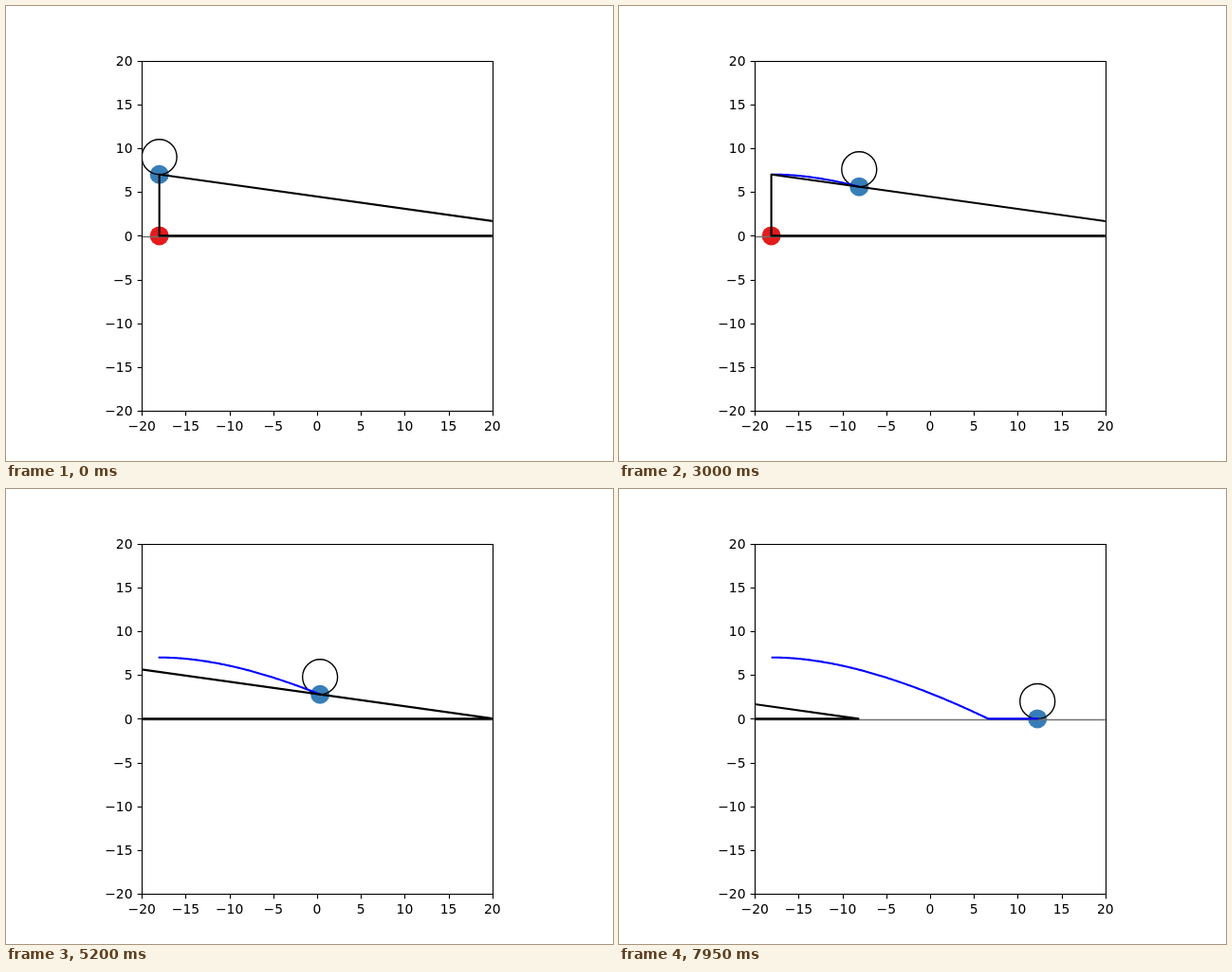
An HTML page with a canvas that plays this animation: 640 by 480 pixels, repeating every 8 s.

```html
<!DOCTYPE html>
<html lang="en">
<head>
<meta charset="utf-8">
<title>Ball on a sliding wedge</title>
<style>
  html, body { margin: 0; width: 100%; height: 100%; overflow: hidden; background: #fff; }
  canvas { display: block; }
</style>
</head>
<body>
<canvas id="stage" width="640" height="480"></canvas>
<script>
const ctx = document.getElementById('stage').getContext('2d');

const LOOP = 8000, STEP = 50;
const SCALE = 9.24, LEFT = 143.2, TOP = 57.6, SIDE = 369.6;
const START = -18, HEIGHT = 7, BASE = 50, SPEED = 3;
const WEDGE_ACCEL = -2.026, BALL_ACCEL = 0.2026;

const px = x => 328 + x * SCALE;
const py = y => 242.4 - y * SCALE;
const crisp = v => Math.floor(v + 0.5) + 0.5;
const travel = (t, accel) => START + SPEED * t + accel * t * t / 2;

function ballAt(t) {
  const x = travel(t, BALL_ACCEL);
  const tip = travel(t, WEDGE_ACCEL) + BASE;
  return [x, Math.max(0, (tip - x) * HEIGHT / BASE)];
}

function polyline(points, color, width) {
  ctx.beginPath();
  for (const [x, y] of points) ctx.lineTo(px(x), py(y));
  ctx.strokeStyle = color;
  ctx.lineWidth = width;
  ctx.stroke();
}

function circle(x, y, radius) {
  ctx.beginPath();
  ctx.arc(px(x), py(y), radius, 0, 2 * Math.PI);
}

function disc(x, y, color) {
  circle(x, y, 10);
  ctx.fillStyle = color;
  ctx.fill();
}

function segment(x1, y1, x2, y2) {
  ctx.beginPath();
  ctx.moveTo(x1, y1);
  ctx.lineTo(x2, y2);
  ctx.stroke();
}

function drawAxes() {
  const left = crisp(LEFT), bottom = crisp(TOP + SIDE);
  ctx.strokeStyle = ctx.fillStyle = '#000';
  ctx.lineWidth = 1.11;
  ctx.lineCap = 'butt';
  ctx.strokeRect(left, crisp(TOP), crisp(LEFT + SIDE) - left, bottom - crisp(TOP));
  ctx.font = '13.89px "DejaVu Sans", sans-serif';
  for (let v = -20; v <= 20; v += 5) {
    const x = crisp(px(v)), y = crisp(py(v));
    const label = String(v).replace('-', '\u2212');
    segment(x, bottom, x, bottom + 4.86);
    segment(left, y, left - 4.86, y);
    ctx.textAlign = 'center';
    ctx.fillText(label, px(v), 448);
    ctx.textAlign = 'right';
    ctx.fillText(label, 133.5, Math.round(py(v) + 5.2));
  }
}

function draw(ms) {
  const frame = Math.floor(ms / STEP), t = frame * STEP / 1000;
  const wedge = travel(t, WEDGE_ACCEL);
  const [ballX, ballY] = ballAt(t);
  const trail = Array.from({ length: frame + 1 }, (_, i) => ballAt(i * STEP / 1000));

  ctx.fillStyle = '#fff';
  ctx.fillRect(0, 0, 640, 480);
  ctx.save();
  ctx.beginPath();
  ctx.rect(LEFT, TOP, SIDE, SIDE);
  ctx.clip();
  ctx.lineCap = 'square';
  ctx.lineJoin = 'round';

  disc(wedge, 0, '#e41a1c');
  disc(ballX, ballY, '#377eb8');
  circle(ballX, ballY + 2, 2 * SCALE);
  ctx.strokeStyle = '#000';
  ctx.lineWidth = 1.39;
  ctx.stroke();

  // The ground sits just under the wedge.
  ctx.strokeStyle = '#707070';
  segment(LEFT, 243.5, LEFT + SIDE, 243.5);
  if (frame > 0) polyline(trail, '#00f', 2.08);
  polyline([[wedge, 0], [wedge, HEIGHT], [wedge + BASE, 0], [wedge, 0]], '#000', 2.08);
  ctx.restore();

  drawAxes();
}

function tick() {
  draw(performance.now() % LOOP);
  requestAnimationFrame(tick);
}
tick();
</script>
</body>
</html>
```
